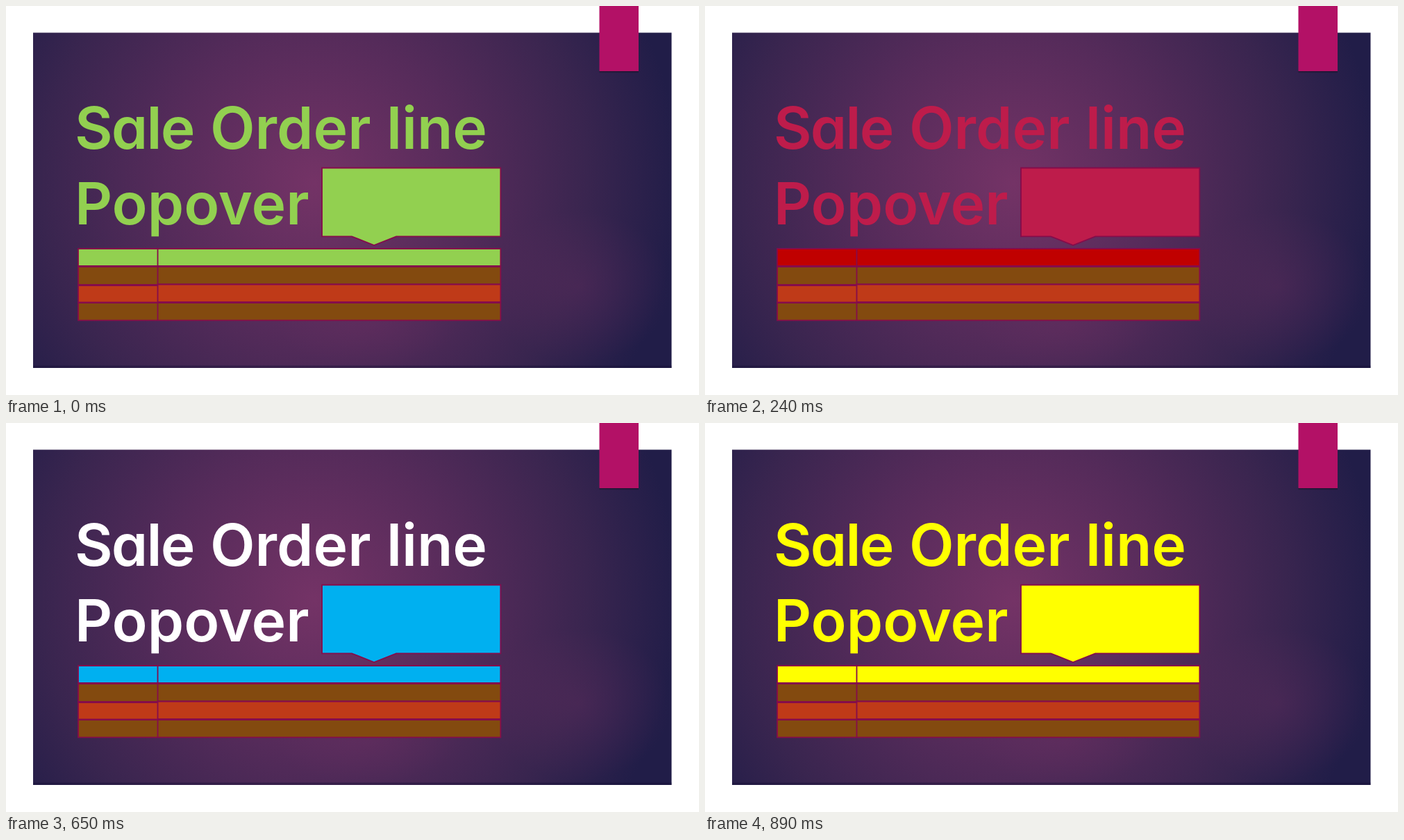
These frames come from a looping animation (998x561 px, 0.96 s). An HTML page:

```html
<!DOCTYPE html>
<html lang="en">
<head>
<meta charset="utf-8">
<title>Sale Order line Popover</title>
<style>
  html, body { margin: 0; width: 100%; height: 100%; overflow: hidden; background: #fff; }
  svg { display: block; width: 100vw; height: 100vh; }
  text { font: 600 84px Inter, Lato, sans-serif; font-feature-settings: "cv11"; fill: var(--title); }
  .tight { letter-spacing: -1.8px; }
  .cell { stroke: #850c4b; stroke-width: 1.8; }
  .accent { fill: var(--accent); }
  .header { fill: var(--header); }
  .brown { fill: #834a0f; }
  .orange { fill: #bf3a18; }
</style>
</head>
<body>
<svg viewBox="0 0 998 561">
  <defs>
    <radialGradient id="backdrop" gradientUnits="userSpaceOnUse" cx="445" cy="255" r="525">
      <stop offset="0" stop-color="#743366"/>
      <stop offset=".42" stop-color="#552b5a"/>
      <stop offset=".75" stop-color="#39254f"/>
      <stop offset="1" stop-color="#211d48"/>
    </radialGradient>
    <radialGradient id="glow">
      <stop offset="0" stop-color="#6c2f62" stop-opacity=".32"/>
      <stop offset="1" stop-color="#6c2f62" stop-opacity="0"/>
    </radialGradient>
    <linearGradient id="shade" x2="0" y2="1">
      <stop offset="0" stop-color="#000" stop-opacity=".5"/>
      <stop offset="1" stop-color="#000" stop-opacity="0"/>
    </linearGradient>
  </defs>

  <rect x="39" y="38.5" width="919.5" height="483.5" fill="url(#backdrop)"/>
  <ellipse cx="825" cy="405" rx="133" ry="110" fill="url(#glow)"/>
  <ellipse cx="520" cy="460" rx="130" ry="60" fill="url(#glow)"/>
  <rect x="39" y="518.5" width="919.5" height="3.5" fill="#150f35" opacity=".4"/>
  <rect x="854.5" y="93" width="56.5" height="4" fill="url(#shade)"/>
  <rect x="854.5" width="56.5" height="94" fill="#b31166"/>

  <g id="slide">
    <text y="206"><tspan class="tight" x="99">Sale</tspan><tspan x="294">Order</tspan><tspan x="548">line</tspan></text>
    <text x="99" y="315">Popover</text>
    <path class="cell accent" d="M455 233.5H712.3V332.3H562L530 345L498 332.3H455Z"/>
    <g class="cell">
      <path class="header" d="M104 350H218.5V375H104ZM218.5 350H712.3V375H218.5Z"/>
      <path class="brown" d="M104 376H218.5V402H104ZM218.5 376H712.3V401.5H218.5Z"/>
      <path class="orange" d="M104 403H218.5V427.5H104ZM218.5 401.5H712.3V427H218.5Z"/>
      <path class="brown" d="M104 428H218.5V453.3H104ZM218.5 428H712.3V453.3H218.5Z"/>
    </g>
  </g>
</svg>
<script>
  const STEP = 240;
  const themes = [
    { title: "#92d050", accent: "#92d050", header: "#92d050" },
    { title: "#be1c4b", accent: "#be1c4b", header: "#c00000" },
    { title: "#ffffff", accent: "#00b0f0", header: "#00b0f0" },
    { title: "#ffff00", accent: "#ffff00", header: "#ffff00" },
  ];
  const slide = document.getElementById("slide");

  function draw(now) {
    const theme = themes[Math.floor(now / STEP) % themes.length];
    for (const part in theme) slide.style.setProperty("--" + part, theme[part]);
  }

  const start = performance.now();
  function tick() {
    draw(performance.now() - start);
    requestAnimationFrame(tick);
  }
  tick();
</script>
</body>
</html>
```
